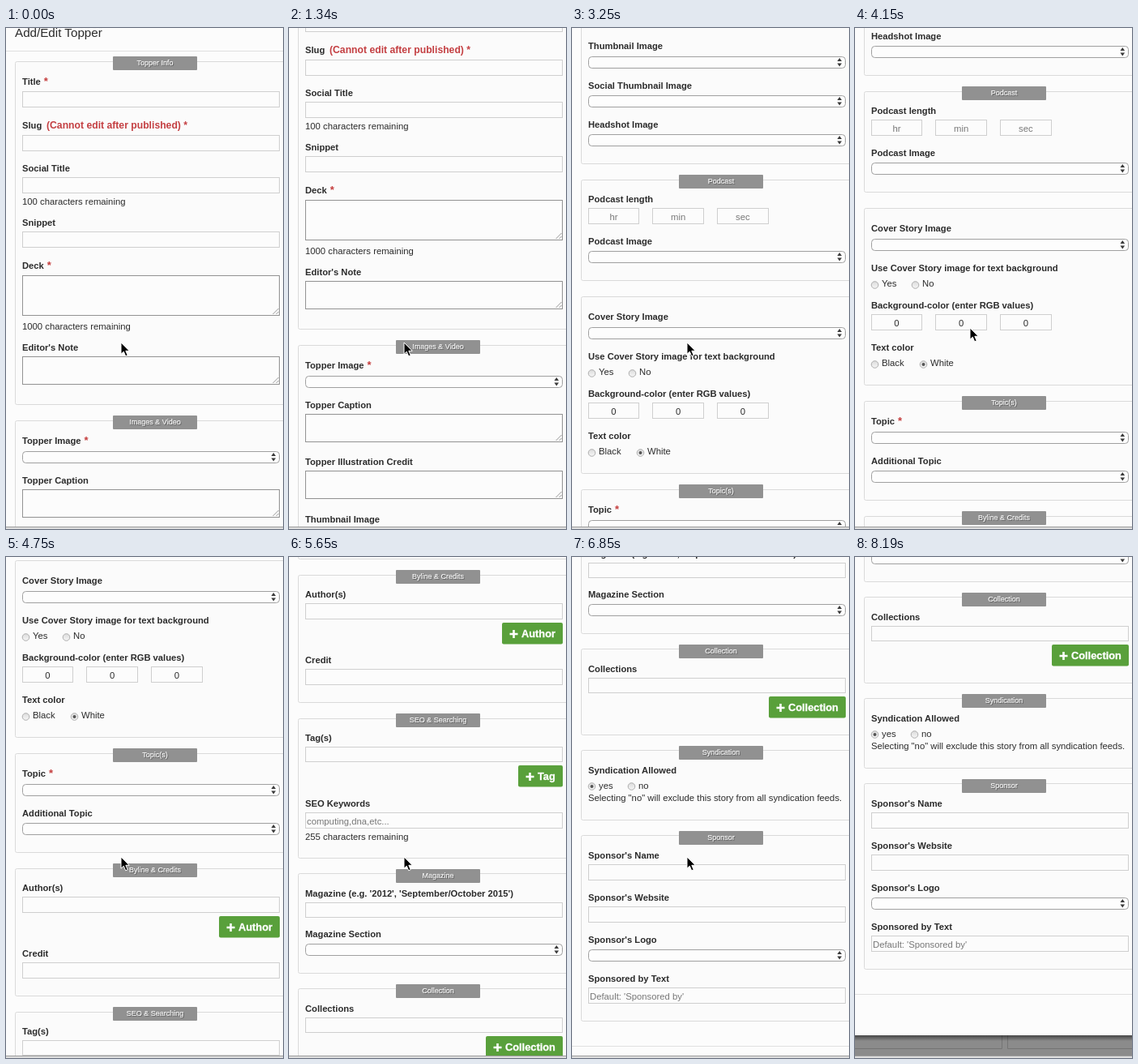
Write an HTML page that moves like this. It is 342 by 618 pixels and loops after 9.54 s.

```html
<!DOCTYPE html>
<html lang="en">
<head>
<meta charset="utf-8">
<title>Topper form</title>
<style>
html, body { margin: 0; width: 100%; height: 100%; overflow: hidden; background: #fcfcfc; }
svg { display: block; width: 100%; height: 100%; }
text { font: 11.3px "Liberation Sans", Arial, sans-serif; fill: #2b2b2b; white-space: pre; }
.head { font-size: 15.2px; }
.label { font-size: 11.2px; font-weight: bold; }
.red { fill: #c43c3c; }
.warn { font-size: 12.2px; font-weight: bold; fill: #c43f42; }
.hint { fill: #777; }
.mid { text-anchor: middle; }
.tab { font-size: 9px; fill: #fff; text-anchor: middle; text-shadow: 1px 1px 0 #666; stroke: #fff; stroke-width: .2px; }
.btn { font-size: 12.8px; font-weight: bold; fill: #fff; stroke: #fff; stroke-width: .3px; }
</style>
</head>
<body>
<svg viewBox="0 0 342 618" preserveAspectRatio="none">
  <defs>
    <linearGradient id="shade" x1="0" y1="0" x2="0" y2="1">
      <stop offset="0" stop-color="#000" stop-opacity=".5"/>
      <stop offset="1" stop-color="#000" stop-opacity="0"/>
    </linearGradient>
    <linearGradient id="knob" x1="0" y1="0" x2="0" y2="1">
      <stop offset="0" stop-color="#dcdcdc"/>
      <stop offset="1" stop-color="#f6f6f6"/>
    </linearGradient>
  </defs>
  <rect width="342" height="618" fill="#8b8b8b"/>
  <path d="M0 606.5H181.5V580M342 606.5H188.5V580" fill="none" stroke="#747474"/>
  <g id="page"></g>
  <rect y="615" width="342" height="1" fill="#9c9c9c"/>
  <rect y="616" width="342" height="2" fill="#dedede"/>
  <path id="cursor" d="M0 0V14.2L3.3 11.2L5.7 16.8L8.2 15.7L5.8 10.3H10.2Z" fill="#000" stroke="#fff"/>
</svg>
<script>
const LOOP = 9540;
const page = document.getElementById('page');
const cursor = document.getElementById('cursor');
const parts = [];
const add = s => parts.push(s);

// Text is placed by the vertical centre of its capitals.
const text = (x, y, str, cls = '') => add(`<text x="${x}" y="${y + 4}" class="${cls}">${str}</text>`);
const box = (x, y, w, h, stroke, fill = '#fcfcfc', r = 0) =>
  add(`<rect x="${x + .5}" y="${y + .5}" width="${w - 1}" height="${h - 1}" rx="${r}" fill="${fill}" stroke="${stroke}"/>`);

function label(y, str, required) {
  const star = required ? '<tspan dx="4" class="red" font-size="13">*</tspan>' : '';
  text(20, y, str + star, 'label');
}
function group(top, bottom, tabY, title) {
  box(11, top, 340, bottom - top + 1, '#dadada', '#fbfbfb', 2);
  if (!title) return;
  add(`<rect x="132" y="${tabY - 8}" width="104" height="17" rx="1" fill="#919191"/>`);
  add(`<text x="184" y="${tabY + 3}" class="tab">${title}</text>`);
}
function input(y, hint, h = 20) {
  box(20, y, 318, h, '#cfcfcf');
  if (hint) text(22, y + 11, hint, 'hint');
}
function area(y, h) {
  box(20, y, 318, h, '#929292');
  const b = y + h - 2;
  add(`<path d="M329.5 ${b}L336.5 ${b - 7}M333.5 ${b}L336.5 ${b - 3}" stroke="#8a8a8a" stroke-width=".9"/>`);
}
function select(y) {
  box(20, y, 318, 15, '#a0a0a0', '#fdfdfd', 4);
  add(`<path d="M327.5 ${y + 6}h5.6l-2.8-4zM327.5 ${y + 8.5}h5.6l-2.8 4z" fill="#3a3a3a"/>`);
}
function trio(y, values, cls) {
  values.forEach((v, i) => {
    box(20 + 80 * i - (i ? 1 : 0), y, i ? 64 : 63, 20, '#cfcfcf');
    text(51.5 + 79.7 * i, y + 11, v, 'mid ' + cls);
  });
}
function radio(x, y, str, on, drop = 2) {
  add(`<circle cx="${x + .5}" cy="${y + drop}" r="4.3" fill="url(#knob)" stroke="#a6a6a6" stroke-width=".9"/>`);
  if (on) add(`<circle cx="${x + .5}" cy="${y + drop}" r="2" fill="#555"/>`);
  text(x + 9, y, str);
}
function button(x, y, str) {
  add(`<rect x="${x}" y="${y}" width="${338 - x}" height="26.5" rx="2" fill="#59a03b"/>`);
  add(`<path d="M${x + 9.5} ${y + 14}h10M${x + 14.5} ${y + 9}v10" stroke="#fff" stroke-width="2.6"/>`);
  text(x + 24, y + 14, str, 'btn');
}

add('<rect y="-10" width="342" height="2449" fill="#fcfcfc"/>');
add('<rect y="2439" width="342" height="7" fill="url(#shade)"/>');
text(11, 7, 'Add/Edit Topper', 'head');
add('<path d="M0 28.5H342M0 2388.5H342" stroke="#e0e0e0"/>');

group(41, 464, 43, 'Topper Info');
label(66, 'Title', true);
input(78);
label(120, 'Slug');
text(50, 120, '(Cannot edit after published) *', 'warn');
input(132);
label(173, 'Social Title');
input(184);
text(20, 214, '100 characters remaining');
label(240, 'Snippet');
input(251);
label(293, 'Deck', true);
area(305, 50);
text(20, 368, '1000 characters remaining');
label(394, "Editor's Note");
area(405, 35);

group(484, 844, 486, 'Images &amp; Video');
label(509, 'Topper Image', true);
select(522);
label(558, 'Topper Caption');
area(569, 35);
label(628, 'Topper Illustration Credit');
area(639, 35);
label(699, 'Thumbnail Image');
select(712);
label(748, 'Social Thumbnail Image');
select(760);
label(796, 'Headshot Image');
select(808);

group(864, 988, 866, 'Podcast');
label(888, 'Podcast length');
trio(899, ['hr', 'min', 'sec'], 'hint');
label(940, 'Podcast Image');
select(952);

group(1008, 1226);
label(1033, 'Cover Story Image');
select(1046);
label(1082, 'Use Cover Story image for text background');
radio(24, 1101, 'Yes');
radio(74, 1101, 'No');
label(1128, 'Background-color (enter RGB values)');
trio(1139, [0, 0, 0], '');
label(1180, 'Text color');
radio(24, 1199, 'Black');
radio(84, 1199, 'White', true);

group(1246, 1368, 1248, 'Topic(s)');
label(1271, 'Topic', true);
select(1284);
label(1320, 'Additional Topic');
select(1332);

group(1388, 1545, 1390, 'Byline &amp; Credits');
label(1412, 'Author(s)');
input(1423);
button(263, 1447, 'Author');
label(1493, 'Credit');
input(1504);

group(1565, 1737, 1567, 'SEO &amp; Searching');
label(1589, 'Tag(s)');
input(1600, '', 19);
button(283, 1623, 'Tag');
label(1670, 'SEO Keywords');
input(1681, 'computing,dna,etc...');
text(20, 1711, '255 characters remaining');

group(1756, 1879, 1759, 'Magazine');
label(1781, "Magazine (e.g. '2012', 'September/October 2015')");
input(1792, '', 19);
label(1831, 'Magazine Section');
select(1843);

group(1898, 2004, 1901, 'Collection');
label(1923, 'Collections');
input(1934, '', 19);
button(243, 1957, 'Collection');

group(2023, 2109, 2026, 'Syndication');
label(2048, 'Syndication Allowed');
radio(24, 2067, 'yes', true, 1);
radio(73, 2067, 'no', false, 1);
text(20, 2082, 'Selecting "no" will exclude this story from all syndication feeds.');

group(2128, 2357, 2131, 'Sponsor');
label(2153, "Sponsor's Name");
input(2164);
label(2205, "Sponsor's Website");
input(2216);
label(2257, "Sponsor's Logo");
select(2269);
label(2305, 'Sponsored by Text');
input(2316, "Default: 'Sponsored by'");

page.innerHTML = parts.join('');

// Each run scrolls in equal ticks; keys are [tick, offset].
const runs = [
  { start: 1190, gap: 147.14, keys: [[0, 0], [7, 326], [15, 677]] },
  { start: 4000, gap: 150, keys: [[0, 677], [6, 1004], [12, 1366], [20, 1785], [21, 1849]] }
];
const exit = [[7750, 274, 445], [7900, 230, 570], [8040, 226, 604], [8190, 226, 640]];

function scrollAt(t) {
  const { start, gap, keys } = t < runs[1].start ? runs[0] : runs[1];
  const last = keys[keys.length - 1];
  const tick = Math.max(0, Math.min(last[0], Math.floor((t - start + 4) / gap) + 1));
  const i = Math.max(1, keys.findIndex(k => k[0] >= tick));
  const [a, from] = keys[i - 1], [b, to] = keys[i];
  return Math.round(from + (to - from) * (tick - a) / (b - a));
}
function cursorAt(t) {
  let pos = [142, t < 4000 ? 388 : 370];
  for (const [at, x, y] of exit) if (t >= at) pos = [x, y];
  return pos;
}
function draw(t) {
  page.setAttribute('transform', `translate(0 ${-scrollAt(t)})`);
  cursor.setAttribute('transform', `translate(${cursorAt(t)})`);
}

const begin = performance.now();
function frame() {
  draw((performance.now() - begin) % LOOP);
  requestAnimationFrame(frame);
}
frame();
</script>
</body>
</html>
```
